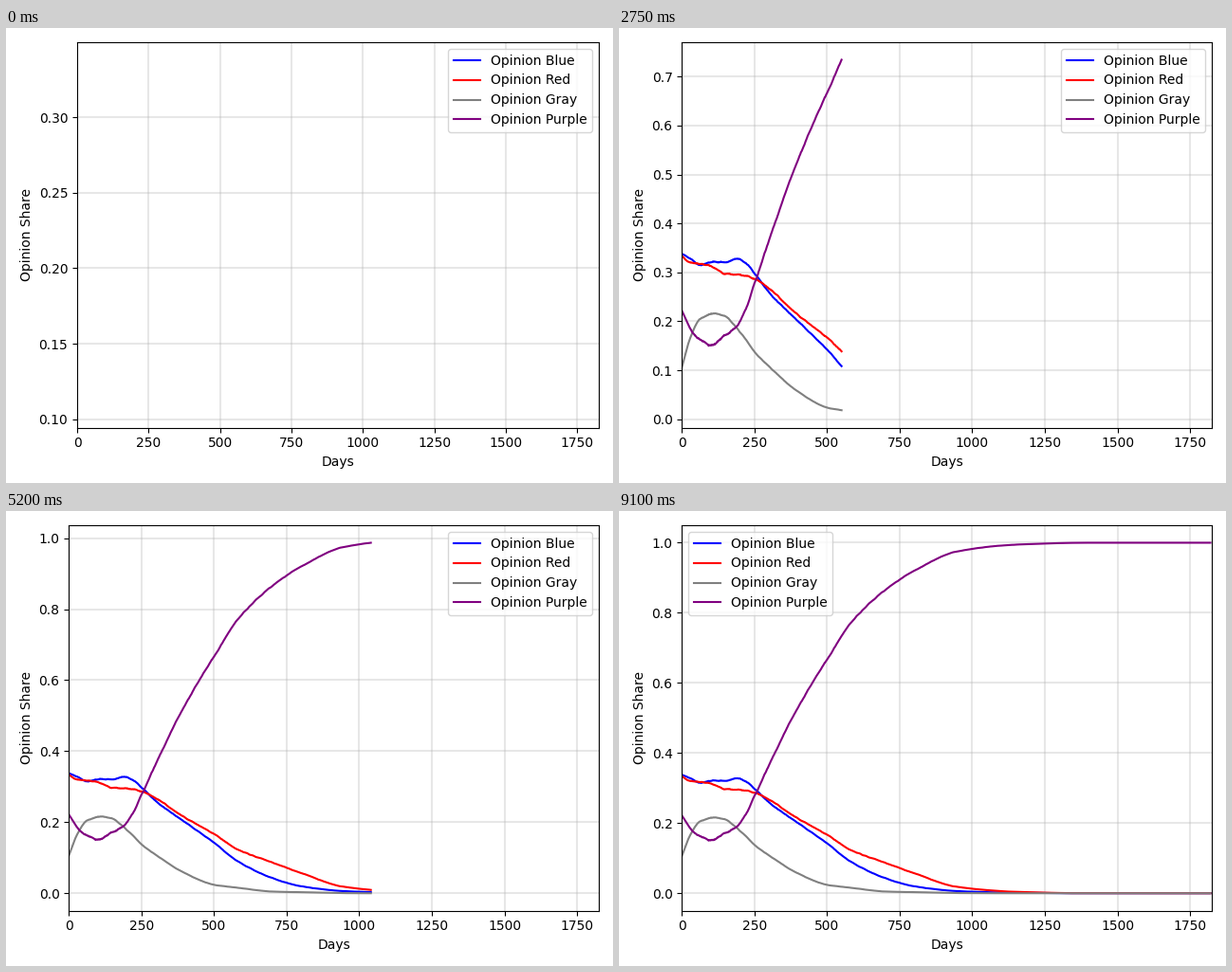
A matplotlib script for the animation above (9.15 s loop, 640 px wide and 480 px high).

```python
import numpy as np
import matplotlib.pyplot as plt
from matplotlib.animation import FuncAnimation

DAYS = 1825
STEP = 10      # days added per frame
FRAMES = 183

# Key shares in thousandths; purple takes the rest.
KEY_DAYS = np.array([0, 30, 60, 110, 150, 185, 215, 250, 300, 400,
                     500, 580, 700, 800, 950, 1150, 1400, DAYS])
BLUE = [338, 329, 315, 322, 321, 327.5, 322, 299, 259, 200.5,
        143, 91, 43, 20, 6, 1.5, 0, 0]
RED = [334, 319, 317.5, 310, 297, 296, 293.5, 287, 267, 213,
       167, 124, 87, 57, 18, 4, 0, 0]
GRAY = [106, 168, 202.5, 216.5, 210, 189, 167, 138, 108, 56.5,
        24, 16, 5, 3, 0.5, 0, 0, 0]

rng = np.random.default_rng(7)
days = np.arange(DAYS)


def smooth(x, xs, ys):
    """Hermite curve through the points, without overshoot."""
    h = np.diff(xs)
    d = np.diff(ys) / h
    a, b = d[:-1], d[1:]
    same = a * b > 0
    inner = np.where(same, 2 * a * b / np.where(same, a + b, 1), 0)
    m = np.concatenate(([d[0]], inner, [d[-1]]))
    i = np.clip(np.searchsorted(xs, x, "right") - 1, 0, len(h) - 1)
    t = (x - xs[i]) / h[i]
    rise = t * t * (3 - 2 * t)
    bend = t * (1 - t) * ((1 - t) * m[i] - t * m[i + 1])
    return ys[i] + rise * (ys[i + 1] - ys[i]) + h[i] * bend


def share(keys):
    """Smooth share with a daily jitter that fades as the share does."""
    base = np.maximum(smooth(days, KEY_DAYS, np.array(keys) / 1000), 0)
    jitter = np.convolve(rng.normal(size=DAYS), np.ones(12) / 12, "same")
    return base + 0.004 * np.sqrt(base) * jitter * np.clip(days / 30, 0, 1)


blue, red, gray = share(BLUE), share(RED), share(GRAY)
series = {"blue": blue, "red": red, "gray": gray,
          "purple": 1 - blue - red - gray}

fig, ax = plt.subplots(figsize=(6.4, 4.8), dpi=100)
lines = {c: ax.plot([], [], color=c, label=f"Opinion {c.title()}")[0]
         for c in series}
ax.set_xlim(0, DAYS)
ax.set_xlabel("Days")
ax.set_ylabel("Opinion Share")
ax.grid(linewidth=1.5, alpha=0.3)
ax.legend(loc="best").set_in_layout(False)


def update(n):
    end = n * STEP + 1
    for color, line in lines.items():
        line.set_data(days[:end], series[color][:end])
    ax.relim()
    ax.autoscale_view()
    if n <= 100:  # the y labels are settled after this
        fig.tight_layout()
    return list(lines.values())


def init():
    return update(0)


anim = FuncAnimation(fig, update, frames=FRAMES, init_func=init,
                     interval=50, repeat=True, repeat_delay=0)
plt.show()
```
